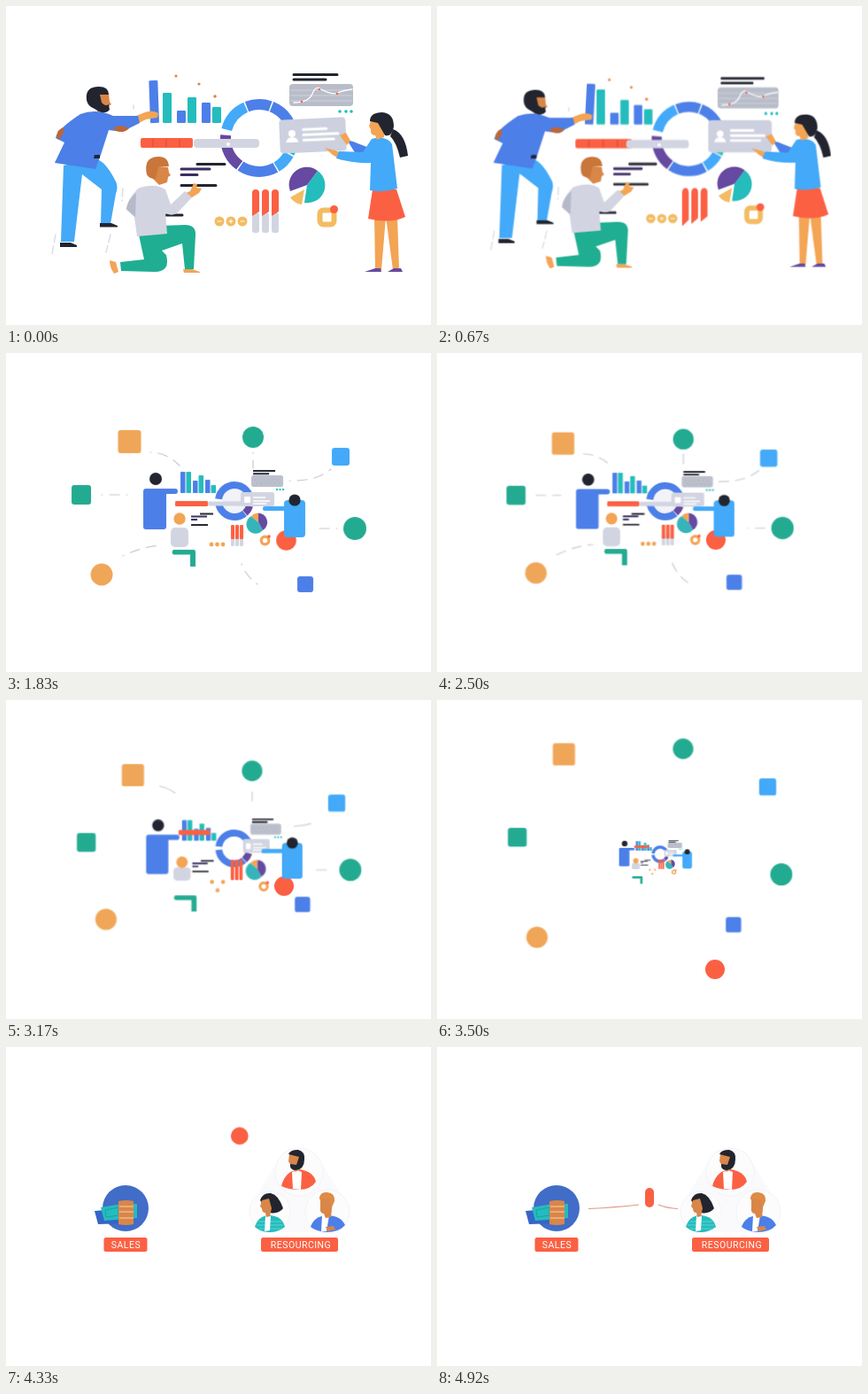
An HTML page for the animation above (5 s loop, 480x360 px).

```html
<!DOCTYPE html>
<html lang="en">
<head>
<meta charset="utf-8">
<title>From tools to teams</title>
<style>
  html, body { margin: 0; width: 100%; height: 100%; overflow: hidden; background: #fff; }
  svg { display: block; width: 480px; height: 360px; }
  text { font: 10.5px Roboto, sans-serif; letter-spacing: .5px; fill: #fff; text-anchor: middle; }
  .line { fill: none; stroke-linecap: round; stroke-linejoin: round; }
  .ink { fill: #22252f; }
  .blue { fill: #4c7fe8; }
  .sky { fill: #43a9f8; }
  .teal { fill: #24bcbc; }
  .green { fill: #1fae91; }
  .red { fill: #fb6043; }
  .gold { fill: #f2bc62; }
  .skin { fill: #f3a455; }
  .tan { fill: #d98648; }
  .grey { fill: #d2d5e1; }
  .purple { fill: #6649a0; }
  .white { fill: #fff; }
</style>
</head>
<body>
<svg viewBox="0 0 480 360">
  <g id="office">
    <g class="line" stroke="#dcdee8" stroke-width="1.5">
      <path d="M56 258L52 280M144 112v4M132 206l-1 14M118 258l-5 20" stroke-dasharray="9 4"/>
    </g>
    <g id="bars"></g>
    <g class="tan"><circle cx="192" cy="79" r="1.6"/><circle cx="218" cy="88" r="1.6"/><circle cx="236" cy="102" r="1.8"/></g>
    <g id="donut"></g>
    <g id="meter"><rect class="red" x="152" y="149" width="59" height="11" rx="2"/>
      <path d="M166 150v9M181 150v9M196 150v9" stroke="#d84c36"/></g>
    <rect class="grey" x="212" y="150" width="74" height="10" rx="4"/>
    <circle class="white" cx="251" cy="156" r="2"/>
    <g class="line" stroke="#22252f" stroke-width="3" stroke-linecap="butt">
      <path d="M325 77.500h49M325 83h36M216 178.500h31M198 202.500h39M180 236h19"/>
      <path stroke="#3b2c62" d="M198 184h32M198 190.500h18"/>
    </g>
    <rect x="320" y="88" width="72" height="25" rx="4" fill="#b8bdc9"/>
    <path class="line" stroke="#d6d9e1" stroke-width=".8" d="M322 95h68M322 101h68M322 107h68"/>
    <path class="line" stroke="#fff" stroke-width="1.300" d="M325 109Q342 109 346 99T356 94Q369 101 375 98T391 94"/>
    <g class="red"><circle cx="334" cy="108" r="1.300"/><circle cx="354" cy="94" r="1.300"/><circle cx="374" cy="99" r="1.300"/></g>
    <g class="teal"><circle cx="377" cy="119" r="1.800"/><circle cx="384" cy="119" r="1.800"/><circle cx="390" cy="119" r="1.800"/></g>
    <g id="card">
      <rect x="309" y="127" width="75" height="38" rx="4" fill="#cdd0de"/>
      <path class="white" d="M316 153q1-6 7-6t7 6z"/><circle class="white" cx="323" cy="143" r="4"/>
      <path class="line" stroke="#fff" stroke-width="3" d="M336 139h26M336 145h39M336 151h34"/>
    </g>
    <path class="teal" d="M340 202L352 186A20 20 0 0 1 337 222Z"/>
    <path class="purple" d="M340 202L321 209A20 20 0 0 1 352 186Z"/>
    <path class="gold" d="M337 207L334 224Q326 223 321 216Z"/>
    <g id="sticks"></g>
    <g class="gold"><circle cx="241" cy="243" r="5.500"/><circle cx="254" cy="243" r="5.500"/><circle cx="267" cy="243" r="5.500"/></g>
    <path stroke="#fff" d="M238.500 243h5M251.500 243h5M254 240.500v5M264.500 243h5"/>
    <rect x="354.500" y="230.500" width="16" height="16" rx="4" fill="none" stroke="#f2bc62" stroke-width="6"/>
    <circle class="red" cx="370.500" cy="229.500" r="4.500"/>

    <!-- standing man -->
    <path class="sky" d="M65 180L100 172Q112 174 124 198Q127 204 124 212L118 246H107L108 207L86 190L77 266H62Z"/>
    <path class="ink" d="M61 267h12l7 3v2H61zM106 245h13l7 3v1.500H106z"/>
    <path class="skin" d="M137 128L157 120Q166 117 172 121L171 126L158 128L140 137Z"/>
    <path class="blue" d="M84 122Q102 115 121 124L149 124L151 132L131 142L116 140L107 168L101 184L55 177L66 154L56 149Q58 139 84 122Z"/>
    <path fill="#b9673b" d="M122 137Q130 133 139 138Q133 145 122 140ZM57 147Q58 139 65 137Q66 146 59 151Z"/>
    <path class="tan" d="M101 98h15l1 10 2 3-3 2-1 6h-12z"/>
    <path class="ink" d="M91 106Q89 91 105 91Q116 91 116 100L106 100L108 109Q112 114 116 111L117 117Q111 124 100 116Q92 113 91 106Z"/>
    <path class="ink" d="M100 168h6v4h-7z"/>

    <!-- kneeling man -->
    <path class="green" d="M148 249L202 247Q215 247 214 259L212 297H202L199 268L176 276L181 281Q186 300 168 300L130 299L129 289L156 286Z"/>
    <path class="skin" d="M117 287l7 2 3 11-5 2q-5-7-5-15zM200 297h10l9 3v1h-18z"/>
    <path class="skin" d="M201 212l7-3 4-9 4 1-1 4 6 1-3 5-8 5-6 2z"/>
    <path class="grey" d="M149 206Q168 199 180 207L186 224L202 209L210 216L193 234Q185 238 180 233L182 257L148 260L145 238L136 230Q137 218 149 206Z"/>
    <path fill="#b5b9c9" d="M136 229Q137 219 147 211L146 238Z"/>
    <path class="tan" d="M164 182h19l1 6 2 3-3 2-1 6-9 3-8-8z"/>
    <path fill="#c9763b" d="M159 190Q155 171 171 170Q183 169 184 181L172 182L169 195Q161 195 159 190Z"/>

    <!-- woman -->
    <path class="skin" d="M416 238h13l-5 60h-7zM429 238h13l2 60h-7z"/>
    <path class="purple" d="M405 300l12-4h6l1 4zM431 300l7-4h8l2 4z"/>
    <path class="red" d="M414 207h27l10 31q-17 8-42 2z"/>
    <path class="blue" d="M385 151l7 2 18 7v10l-15-3z"/>
    <path class="skin" d="M377 146l7-3 5 9-4 5zM360 160l12 3 8 4-1 7-10-6z"/>
    <path class="sky" d="M413 150Q430 146 436 156L442 206Q427 211 411 208L412 177Q393 178 373 172L376 164L403 165Z"/>
    <path class="ink" d="M437 139Q451 144 454 169L445 171Q441 154 434 147Z"/>
    <path class="skin" d="M413 126h14v22l-8 3-2-5q-6 0-5-7l-2-3z"/>
    <path class="ink" d="M411 130Q411 120 425 120Q438 121 438 136Q436 148 428 146L420 132Z"/>
  </g>

  <g id="ring"></g>

  <g id="flat">
    <g id="man">
      <circle class="ink" cx="169" cy="142" r="7"/>
      <path class="blue" d="M158 153h33q3 0 3 3t-3 3h-10v37q0 3-3 3h-20q-3 0-3-3v-40q0-3 3-3z"/>
    </g>
    <g id="upper">
      <g id="miniBars"></g>
      <path stroke="#22252f" stroke-width="2" d="M279 133h25M279 136.300h18"/>
      <rect x="277" y="138" width="36" height="13" rx="2.500" fill="#bcc0cc"/>
      <path stroke="#a6abb8" stroke-dasharray="1 4" d="M281 143h30M283 147h28"/>
      <path stroke="#24bcbc" stroke-width="2" stroke-dasharray="2 1.500" d="M305 154h9"/>
    </g>
    <g id="miniDonut"></g>
    <rect id="miniMeter" class="red" x="191" y="167" width="37" height="6" rx="1.500"/>
    <rect id="handle" class="grey" x="228" y="167.500" width="42" height="5" rx="2"/>
    <g id="miniCard">
      <rect x="265" y="157" width="38" height="16" rx="2.500" fill="#d2d5e1"/>
      <rect class="white" x="269" y="162" width="7" height="7" rx="1"/>
      <path stroke="#fff" stroke-width="1.500" d="M279 163h14M279 167h19M279 170h15"/>
    </g>
    <path stroke="#22252f" stroke-width="2" d="M219 181.500h15M209 194h19"/>
    <path stroke="#3b2c62" stroke-width="2" d="M209 184.500h18M209 188h7"/>
    <g id="miniPie">
      <path fill="#35b5b9" d="M285 191L290 200A10.500 10.500 0 1 1 277 184Z"/>
      <path class="purple" d="M285 191V180.500A10.500 10.500 0 0 1 290 200Z"/>
      <path class="skin" d="M285 191L277 184Q280 180.500 285 180.500Z"/>
    </g>
    <g id="miniSticks"></g>
    <g id="beads" class="skin"></g>
    <circle cx="292.500" cy="211.500" r="4.300" fill="none" stroke="#f3a455" stroke-width="3.200"/>
    <circle class="red" cx="297" cy="207" r="1.800"/>
    <rect id="kidBody" class="grey" x="186" y="197" width="20" height="22" rx="5"/>
    <circle id="kidHead" class="skin" cx="196" cy="187" r="6.700"/>
    <path id="kidLeg" d="M189 222h23q2 0 2 2v17h-6v-13.500h-19q-3-2.700 0-5.500z"/>
  </g>
  <circle id="ball" class="red" r="11"/>
  <g id="lady">
    <rect class="sky" x="290" y="173" width="28" height="5" rx="2"/>
    <rect class="sky" x="314" y="166" width="24" height="42" rx="4"/>
    <circle class="ink" cx="326" cy="166" r="6.600"/>
  </g>

  <g id="finale">
    <g class="line" stroke="#dc9a85" stroke-width="1.200">
      <path id="wireA" pathLength="100" stroke-dasharray="100" stroke-linecap="butt" d="M171 182.500Q202 181 228 178"/>
      <path id="wireB" pathLength="100" stroke-dasharray="100" stroke-linecap="butt" d="M250 178Q260 182 272 182.500"/>
    </g>
    <g id="sales">
      <circle cx="135" cy="182" r="26" fill="#416cc8"/>
      <g id="grab">
        <path fill="#3465c8" d="M102 186l10-4 4 17-13 2-3-7z"/>
        <path class="teal" d="M107 181l9-2v18l-8 1z"/>
        <path class="white" d="M114 180h17v15h-17z"/>
        <path class="tan" d="M128 169l14-2 2 4-15 2zM128 176h16v23q-8 4-16 0z"/>
        <path stroke="#a9623b" d="M129 182h15M128 188h16M128 194h16"/>
      </g>
      <g id="notes">
        <path fill="#3465c8" d="M100 185l34-3v17l-30 1z"/>
        <path class="teal" d="M107 181l24-4h17v16l-37 3z"/>
        <path stroke="#1b9fac" fill="none" d="M112 184l15-3v9l-14 2z"/>
        <path class="tan" d="M127 174q9-2 17 0v26q-9 2-17 0z"/>
        <path stroke="#f0b98c" stroke-width="1.400" d="M128 180h16M128 186h16M128 193h16"/>
      </g>
    </g>
    <g id="tags">
      <rect class="red" x="110.500" y="215" width="49" height="16" rx="2.500"/>
      <text x="135.500" y="227">SALES</text>
      <rect class="red" x="288" y="215" width="87" height="16" rx="2.500"/>
      <text x="333" y="227">RESOURCING</text>
    </g>
    <path id="web" fill="#fafafc" d="M312 120Q331 107 350 120L384 176Q386 202 364 209H298Q276 202 278 176Z"/>
    <g id="top">
      <circle cx="331" cy="141" r="27" fill="#fcfcfd" stroke="#f2f3f7"/>
      <path class="red" d="M311 157Q315 140 331 138Q347 140 350 152Q344 161 331 161Q319 161 311 157Z"/>
      <path class="white" d="M323 141l6-2 5 2-1 20-9-1z"/>
      <path class="tan" d="M320 121h13v16l-6 4-4-5-4-7z"/>
      <path class="ink" d="M319 121Q321 116 330 116Q338 118 337 127Q337 138 327 139Q320 139 321 132L328 133L331 124Z"/>
    </g>
    <g id="left">
      <circle cx="298" cy="186" r="23" fill="#fcfcfd" stroke="#f2f3f7"/>
      <path class="teal" d="M281 203Q285 190 298 190Q312 191 315 203Q307 209 298 209Q288 209 281 203Z"/>
      <path class="line" stroke="#5ad4d2" d="M283 201h30M286 205h26M286 197h25"/>
      <path class="white" d="M293 191h6l-1 16-6 1z"/>
      <path class="ink" d="M287 173Q290 164 299 165Q308 167 313 182Q308 189 297 187Z"/>
      <path class="tan" d="M289 173l8-2 3 11-2 9-4 1-1-5q-4 0-4-5l-2-2z"/>
    </g>
    <g id="right">
      <circle cx="363" cy="186" r="25" fill="#fcfcfd" stroke="#f2f3f7"/>
      <path class="blue" d="M344 203Q348 191 362 190Q378 190 383 201Q376 209 362 209Q350 208 344 203Z"/>
      <path class="white" d="M357 190h8l-3 18h-6z"/>
      <path class="tan" d="M355 171h13v12l-1 9-6 1-2-5q-5 0-4-7zM361 203l9-1 2 4-9 2z"/>
      <path fill="#de8b45" d="M354 172Q354 163 363 164Q372 165 371 174L368 181L365 172Z"/>
    </g>
  </g>
  <rect id="pill" class="red" x="235" y="159" width="10" height="22" rx="5"/>
</svg>
<script>
const LOOP = 5000, STEP = 250 / 3;
const C = { blue: '#4c7fe8', sky: '#43a9f8', teal: '#24bcbc', green: '#23ab91',
            purple: '#6649a0', orange: '#f0a658', grey: '#d2d5e1', red: '#fb6043' };
const $ = id => document.getElementById(id);
const anims = [];

function add(parent, tag, attrs) {
  const el = document.createElementNS('http://www.w3.org/2000/svg', tag);
  for (const k in attrs) el.setAttribute(k, attrs[k]);
  return parent.appendChild(el);
}

function play(el, frames) {
  const a = el.animate(frames, { duration: LOOP, fill: 'both' });
  a.pause();
  anims.push(a);
}

// Rows are [ms, ...values]; make() turns the values into CSS properties.
function track(el, rows, make) {
  const keys = rows.map(([ms, ...v]) => ({ offset: ms / LOOP, ...make(...v) }));
  play(el, [{ ...keys[0], offset: 0 }, ...keys, { ...keys[keys.length - 1], offset: 1 }]);
}

function show(el, from, to = LOOP) {
  const key = (ms, opacity) => ({ offset: ms / LOOP, opacity, easing: 'step-end' });
  play(el, [key(0, 0), key(from, 1), key(to, to < LOOP ? 0 : 1), key(LOOP, to < LOOP ? 0 : 1)]);
}

const shift = (x, y) => ({ transform: `translate(${x}px, ${y}px)` });
const zoom = (cx, cy) => (k, dx = 0, dy = 0, sy = k) => ({
  transform: `translate(${cx + dx}px, ${cy + dy}px) scale(${k}, ${sy}) translate(${-cx}px, ${-cy}px)`
});
const turn = (cx, cy) => a => ({
  transform: `translate(${cx}px, ${cy}px) rotate(${a}deg) translate(${-cx}px, ${-cy}px)`
});

function bars(parent, base, w, list) {
  return list.map(([x, top], i) => add(parent, 'rect',
    { x, y: top, width: w, height: base - top, rx: w / 8, fill: i % 2 ? C.teal : C.blue }));
}

function donut(parent, cx, cy, r, w, parts) {
  for (const [color, from, to] of parts)
    add(parent, 'circle', { cx, cy, r, fill: 'none', stroke: color, 'stroke-width': w, pathLength: 100,
      'stroke-dasharray': `${to - from - .6} 100`, 'stroke-dashoffset': -from });
}

// Illustrated office
const tall = bars($('bars'), 132, 10, [[163, 84], [177, 98], [193, 118], [205, 103], [221, 109], [233, 114]]);
track(tall[0], [[0, -2], [670, 3]], turn(168, 132));
track(tall[1], [[0, 1], [670, 1.22]], k => zoom(182, 132)(1, 0, 0, k));
track($('card'), [[0, -2.5], [670, 0]], turn(346, 146));
donut($('donut'), 286, 149, 38, 12, [[C.teal, 2, 8], [C.sky, 8, 17], [C.blue, 17, 35], [C.purple, 35, 52],
  [C.sky, 54, 69], [C.blue, 69, 81], [C.blue, 81, 102]]);
for (const x of [278, 289, 300]) {
  show(add($('sticks'), 'rect', { x, y: 233, width: 8, height: 23, rx: 3, fill: C.grey }), 0, 480);
  const red = add($('sticks'), 'path', { d: `M${x} 211q0-4 4-4t4 4v21l-8 5z`, fill: C.red });
  track(red, [[0, 1], [300, 1.1], [670, 1.5 - (x - 278) / 130]], k => zoom(x, 207)(1, 0, 0, k));
}
track($('meter'), [[0, 1], [670, 1.13]], k => zoom(152, 154)(k, 0, 0, 1));
track($('office'), [[0, 1], [330, .99], [580, .972], [670, .955], [750, .88], [833, .77]], zoom(250, 171));
show($('office'), 0, 900);

// Flat version of the same scene
bars($('miniBars'), 158, 5.5, [[197, 134], [203.5, 134], [211, 144], [217.5, 138], [225, 143], [231.5, 149]]);
const hub = add($('miniDonut'), 'circle', { cx: 258, cy: 167, r: 14, fill: '#f1f3f8' });
donut($('miniDonut'), 258, 167, 18, 8, [[C.purple, 5, 14], [C.blue, 14, 49], [C.blue, 52, 105]]);
for (const x of [254, 259, 264]) {
  show(add($('miniSticks'), 'rect', { x, y: 206, width: 4, height: 12, rx: 1.5, fill: C.grey }), 0, 3100);
  const red = add($('miniSticks'), 'rect', { x, y: 194, width: 4, height: 16, rx: 1, fill: C.red });
  track(red, [[3000, 1, 0, 0, 1], [3170, 1, 0, -14, 1.5]], zoom(x, 194));
}
[232, 238.5, 245].forEach((cx, i) => {
  const bead = add($('beads'), 'circle', { cx, cy: 216, r: 2.4 });
  track(bead, [[3000, 0, 0], [3170, 0, i === 1 ? 0 : -10]], shift);
});
const shrink = [[917, 1.3, 3], [1000, 1.14, 2], [1250, 1.06, 1], [1830, 1, 0], [2420, .98, 0], [3170, .965, 0],
  [3330, .85, 0], [3500, .45, 0], [3583, .1, 0]];
for (const id of ['flat', 'lady']) {
  track($(id), shrink, zoom(247, 180));
  show($(id), 900, 3580);
}
for (const el of $('lady').children) track(el, [[3000, 0, 0], [3170, 0, -5.5]], shift);
track($('man'), [[3000, 0, 0], [3170, 0, -2]], shift);
track($('upper'), [[1000, 0, -4.5], [1400, 0, 0]], shift);
track($('miniDonut'), [[1000, 1.06], [1400, 1]], zoom(258, 167));
track($('miniPie'), [[1000, 85], [1400, 0]], turn(285, 191));
track($('miniMeter'), [[3000, 0, 0], [3170, 2, -22]], shift);
track($('miniCard'), [[3000, 1, 0, 0], [3170, .82, 0, -1, 1]], (k, dx, dy, sy = 1) => zoom(284, 165)(k, dx, dy, sy));
track($('kidHead'), [[3000, 0, 0], [3170, 1, -4]], shift);
track($('kidBody'), [[3000, 1, 0, 0, 1], [3170, 1, 1, -8, .7]], zoom(196, 197));
track($('kidLeg'), [[1000, C.teal], [1500, C.green]], fill => ({ fill }));
show($('handle'), 0, 3100);
show(hub, 0, 3100);

// App icons around the scene: x, y, size, colour, round, start, lift, connector and its end
const icons = [
  [108, 250, 25, C.orange, 1, 830, 0, 'M132 229Q152 219 174 217', 3100],
  [279, 95, 24, C.green, 1, 880, -19, 'M279 112v18', 3230],
  [378, 117, 20, C.sky, 0, 970, -3, 'M320 144Q350 145 367 131', 3230],
  [85, 160, 22, C.green, 0, 1030, 0, 'M108 160h29', 3100],
  [394, 198, 26, C.green, 1, 1080, -6, 'M374 198h-20', 3230],
  [139.5, 100, 26, C.orange, 0, 1140, -19, 'M163 112Q181 112 196 127', 3230],
  [338, 261, 18, C.blue, 0, 1200, -29, 'M266 238Q272 253 284 261', 3100]
];
for (const [x, y, s, fill, round, start, lift, d, end] of icons) {
  const g = add($('ring'), 'g', {});
  const wire = add(g, 'path', { d, class: 'line', stroke: '#c6c9d3', 'stroke-width': 1.2 });
  track(wire, [[1250, 11, 8, 19], [3000, 11, 8, -8], [3170, 20, 60, -8]],
    (dash, gap, o) => ({ strokeDasharray: `${dash}px, ${gap}px`, strokeDashoffset: `${o}px` }));
  show(wire, start + 250, end);
  const mark = add(g, 'rect', { x: x - s / 2, y: y - s / 2, width: s, height: s, rx: round ? s / 2 : 3, fill });
  track(mark, [[start, 0], [start + 250, 1.08], [start + 400, 1], [3500, 1], [3667, 0]], zoom(x, y));
  track(g, [[3000, 0, 0], [3170, 0, lift], [3500, 0, lift + (y - 180) * .3]], shift);
}
track($('ring'), [[833, 1.16], [1000, 1.12], [1250, 1.05], [1830, 1], [2420, .975], [3170, .965]], zoom(247, 180));
show($('ring'), 800, 3660);

// The ball outlives the scene and becomes the link between the teams
track($('ball'), [[917, 338, 220, 1.3], [1000, 327.5, 216, 1.16], [1250, 322, 213, 1.06], [1830, 316.5, 211.5, 1.03],
  [2420, 315, 211, 1], [3170, 314, 210, 1], [3330, 314, 245, 1], [3500, 314, 304, 1], [3583, 314, 170, 1],
  [3667, 314, 85, 1], [3750, 314, 56, 1], [3830, 314, 59, 1], [4083, 296, 82, 1], [4330, 264, 100, .9],
  [4670, 240, 135, .75]], (x, y, k) => ({ transform: `translate(${x}px, ${y}px) scale(${k})` }));
show($('ball'), 900, 4700);
track($('pill'), [[4750, 1, 0, -20, .75], [4833, 1, 0, -6, 1.1], [4917, 1, 0, 0, 1]], zoom(240, 170));
show($('pill'), 4700);

// Teams
show($('finale'), 3600);
track($('sales'), [[3583, 0, 0, 9], [3667, .6, 0, 9], [3750, 1.06, 0, 9], [3833, 1, 0, 9], [4083, 1, 0, 0]], zoom(135, 182));
show($('grab'), 3600, 4240);
show($('notes'), 4240);
track($('tags'), [[3667, 0, 12], [3833, 0, -2], [4083, 0, 0]], shift);
show($('tags'), 3700);
show($('web'), 4240);
const people = [['top', 331, 141, -2, 26], ['left', 298, 186, -1, 9], ['right', 363, 186, -1, 25]];
for (const [id, x, y, dx, dy] of people)
  track($(id), [[3583, 0, dx, dy + 12], [3750, .9, dx, dy + 5], [3833, 1, dx, dy], [4083, 1, 0, -3], [4250, 1, 0, 0]], zoom(x, y));
for (const [id, from, to] of [['wireA', 4420, 4800], ['wireB', 4750, 4917]]) {
  track($(id), [[from, 100], [to, 0]], o => ({ strokeDashoffset: o }));
  show($(id), from);
}

// Twelve pictures per second
const begin = performance.now();
function tick() {
  const ms = Math.floor((performance.now() - begin) % LOOP / 10) * 10;
  const time = Math.floor((ms + 3.34) / STEP) * STEP;
  for (const a of anims) a.currentTime = time;
  requestAnimationFrame(tick);
}
tick();
</script>
</body>
</html>
```
